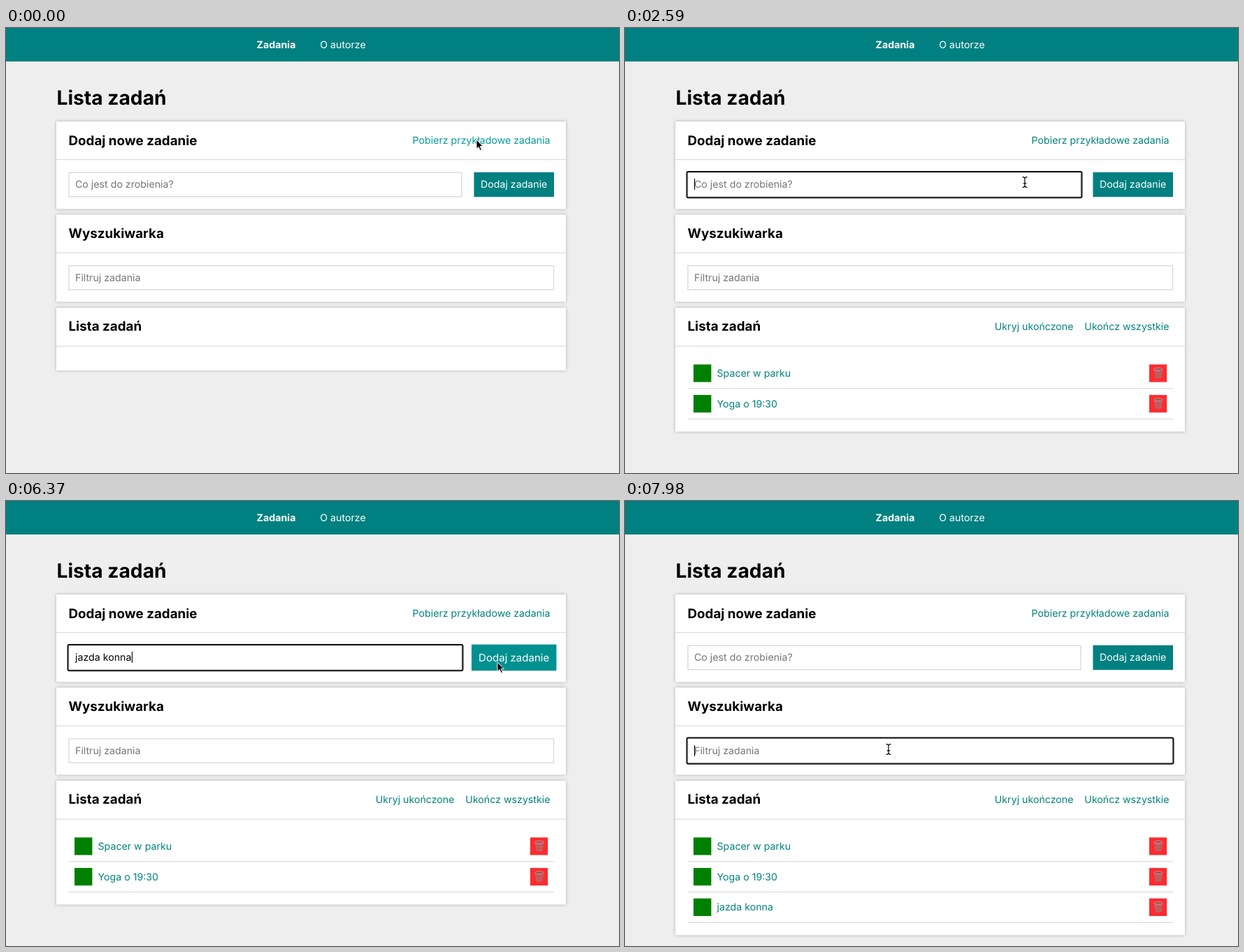
An HTML page that plays this animation: 877 px wide and 638 px high, repeating every 8 s.

```html
<!DOCTYPE html>
<html lang="pl">
<head>
<meta charset="utf-8">
<title>Lista zadań</title>
<style>
  html, body { margin: 0; width: 100%; height: 100%; overflow: hidden; background: #eee; }
  svg { display: block; width: 877px; height: 638px; }
  text {
    font: 14.2px Inter, "Open Sans", sans-serif;
    font-optical-sizing: none;
    text-rendering: geometricPrecision;
    white-space: pre;
  }
  .h1 { font-size: 28.2px; font-weight: 700; }
  .h2 { font-size: 18.8px; font-weight: 700; }
  .bold { font-weight: 700; }
  .white { fill: #fff; }
  .teal { fill: #008080; }
  .hint { fill: #757575; }
  .end { text-anchor: end; }
  .mid { text-anchor: middle; }
  .card { fill: #fff; filter: drop-shadow(0 0 2px #aaa); }
  .rule { fill: #dcdcdc; }
  .box { fill: #fff; stroke: #d8d8d8; stroke-width: 1.3; }
  .ring { fill: none; stroke: #101010; stroke-width: 2; }
</style>
</head>
<body>
<svg id="stage" viewBox="0 0 877 638">
  <rect width="877" height="638" fill="#eee"/>
  <rect width="877" height="48" fill="#008080"/>
  <text class="bold white mid" x="386.5" y="28.5">Zadania</text>
  <text class="white mid" x="482" y="28.5">O autorze</text>
  <text class="h1" x="72.5" y="110">Lista zadań</text>

  <rect class="card" x="72" y="134" width="729" height="125.5"/>
  <rect class="rule" x="72" y="188" width="729" height="1.2"/>
  <text class="h2" x="89.5" y="167.5">Dodaj nowe zadanie</text>
  <text class="end" id="fetch" x="778.5" y="166">Pobierz przykładowe zadania</text>
  <rect class="box" x="90" y="207.3" width="562" height="34.5"/>
  <rect class="ring" id="addRing" x="88.5" y="206" width="565" height="37.2" rx="2"/>
  <text class="hint" id="addHint" x="99" y="229">Co jest do zrobienia?</text>
  <text id="typed" x="99" y="229"></text>
  <g id="button">
    <rect id="face" x="669.5" y="206.8" width="114.5" height="35.4"/>
    <text class="white mid" x="726.7" y="229.3">Dodaj zadanie</text>
  </g>

  <rect class="card" x="72" y="267.5" width="729" height="125"/>
  <rect class="rule" x="72" y="321.8" width="729" height="1.2"/>
  <text class="h2" x="89.5" y="301">Wyszukiwarka</text>
  <rect class="box" x="90" y="340.8" width="693.5" height="34.5"/>
  <rect class="ring" id="findRing" x="88.5" y="339.5" width="696" height="37.2" rx="2"/>
  <text class="hint" x="99" y="363">Filtruj zadania</text>

  <rect class="card" id="list" x="72" y="401" width="729" height="90"/>
  <rect class="rule" x="72" y="455.6" width="729" height="1.2"/>
  <text class="h2" x="89.5" y="434.3">Lista zadań</text>
  <g id="actions">
    <text class="teal end" x="641.5" y="433">Ukryj ukończone</text>
    <text class="teal end" x="778.5" y="433">Ukończ wszystkie</text>
  </g>
  <g id="rows"></g>

  <rect id="caret" y="216" width="1.1" height="16"/>
  <path id="arrow" d="M0 0V13.4L3.1 10.6L5.3 15.6L7.5 14.6L5.3 9.8H9.5Z"
        stroke="#fff" stroke-width="1" stroke-linejoin="round"/>
  <g id="beam" fill="none" stroke-linecap="round">
    <path d="M-3 -7.3Q0 -7.3 0 -5V5Q0 7.3 -3 7.3M3 -7.3Q0 -7.3 0 -5V5Q0 7.3 3 7.3M-1.8 1.8H1.8" stroke="#fff" stroke-width="2.8"/>
    <path d="M-3 -7.3Q0 -7.3 0 -5V5Q0 7.3 -3 7.3M3 -7.3Q0 -7.3 0 -5V5Q0 7.3 3 7.3M-1.8 1.8H1.8" stroke="#000" stroke-width="1.2"/>
  </g>
</svg>
<script>
const LOOP = 8000, STEP = 70;
const LOADED = 1680, FOCUS = 2450, ADDED = 6510, FILTER = 7840;
const TASK = 'jazda konna';
const KEYS = [3290, 3430, 3640, 3850, 4060, 4200, 4340, 4550, 4830, 4970, 5110];
// caret visible: from, to
const CARET = [[2520, 3010], [3290, 5600], [6090, 7000], [7490, LOOP]];
// cursor: time, x, y
const PATH = [
  [0, 673, 160], [1820, 673, 160], [2240, 572, 221], [5880, 572, 221],
  [6230, 703, 231], [6930, 703, 231], [7420, 382, 344], [7700, 377, 356]
];
const FIELDS = [[90, 207, 652, 242], [90, 341, 784, 376]];

const $ = id => document.getElementById(id);
const show = (id, on) => { $(id).style.display = on ? '' : 'none'; };
const within = (t, a, b) => t >= a && t < b;
const ramp = (t, a, b) => {
  const p = Math.min(1, Math.max(0, (t - a) / (b - a)));
  return p * p * (3 - 2 * p);
};
const teal = light => {
  const v = Math.round(128 * (1 + light));
  return `rgb(0,${v},${v})`;
};

$('rows').innerHTML = ['Spacer w parku', 'Yoga o 19:30', TASK].map((name, i) => `
  <g transform="translate(0 ${i * 43.7})">
    <rect x="98" y="482.4" width="25.4" height="25.2" fill="#008000"/>
    <text class="teal" x="131.5" y="500">${name}</text>
    <rect x="750" y="482.4" width="25.2" height="25.2" fill="#fb2c30"/>
    <path d="M757 489.2L758.8 501.6Q763 503.2 767.2 501.6L769 489.2Z" fill="#c9696a"/>
    <path d="M759.6 491L761 501.6M763 491V502M766.4 491L765 501.6M758 494.5H768M758.6 498H767.4"
          fill="none" stroke="#a85050" stroke-width=".7"/>
    <ellipse cx="763" cy="489" rx="6.3" ry="1.7" fill="#a34b4d" stroke="#d69494" stroke-width=".9"/>
    <rect class="rule" x="89.5" y="516.2" width="694.5" height="1.3"/>
  </g>`).join('');
const rows = [...$('rows').children];

function cursorAt(t) {
  const n = PATH.findIndex(k => k[0] > t);
  if (n < 0) return PATH[PATH.length - 1].slice(1);
  const [t0, x0, y0] = PATH[n - 1], [t1, x1, y1] = PATH[n];
  const p = ramp(t, t0, t1);
  return [x0 + (x1 - x0) * p, y0 + (y1 - y0) * p];
}

function drawCursor(t) {
  const [x, y] = cursorAt(t);
  const visible = !within(t, KEYS[0], 5950);
  const inField = FIELDS.some(([l, u, r, d]) => x > l && x < r && y > u && y < d);
  show('arrow', visible && !inField);
  show('beam', visible && inField);
  for (const id of ['arrow', 'beam']) $(id).setAttribute('transform', `translate(${x} ${y})`);
}

function drawCaret(t) {
  const empty = $('typed').textContent === '';
  const x = empty ? 99 : 99.5 + $('typed').getComputedTextLength();
  show('caret', within(t, FILTER, LOOP) || CARET.some(([a, b]) => within(t, a, b)));
  $('caret').setAttribute('x', x);
  $('caret').setAttribute('y', t >= FILTER ? 350 : 216);
}

function draw(time) {
  const t = Math.floor(time / STEP) * STEP;

  const press = ramp(t, 350, 490) - ramp(t, 490, 630);
  const linkHover = 1 - ramp(t, 1890, 2240);
  $('fetch').setAttribute('fill', teal(0.2 * linkHover + 0.2 * press));

  const hover = ramp(t, 6090, 6580) - ramp(t, 7000, 7490);
  $('face').setAttribute('fill', teal(0.2 * hover));
  $('button').setAttribute('transform',
    `translate(726.75 224.5) scale(${1 + 0.1 * hover}) translate(-726.75 -224.5)`);

  const count = t >= ADDED ? 3 : t >= LOADED ? 2 : 0;
  rows.forEach((row, i) => { row.style.display = i < count ? '' : 'none'; });
  $('list').setAttribute('height', 90 + count * 43.8);
  show('actions', count);

  const typed = t < ADDED ? TASK.slice(0, KEYS.filter(k => k <= t).length) : '';
  if ($('typed').textContent !== typed) $('typed').textContent = typed;
  show('addHint', !typed);
  show('addRing', within(t, FOCUS, FILTER));
  show('findRing', t >= FILTER);

  drawCaret(t);
  drawCursor(t);
}

const start = performance.now();
function tick() {
  draw((performance.now() - start) % LOOP);
  requestAnimationFrame(tick);
}
tick();
</script>
</body>
</html>
```
